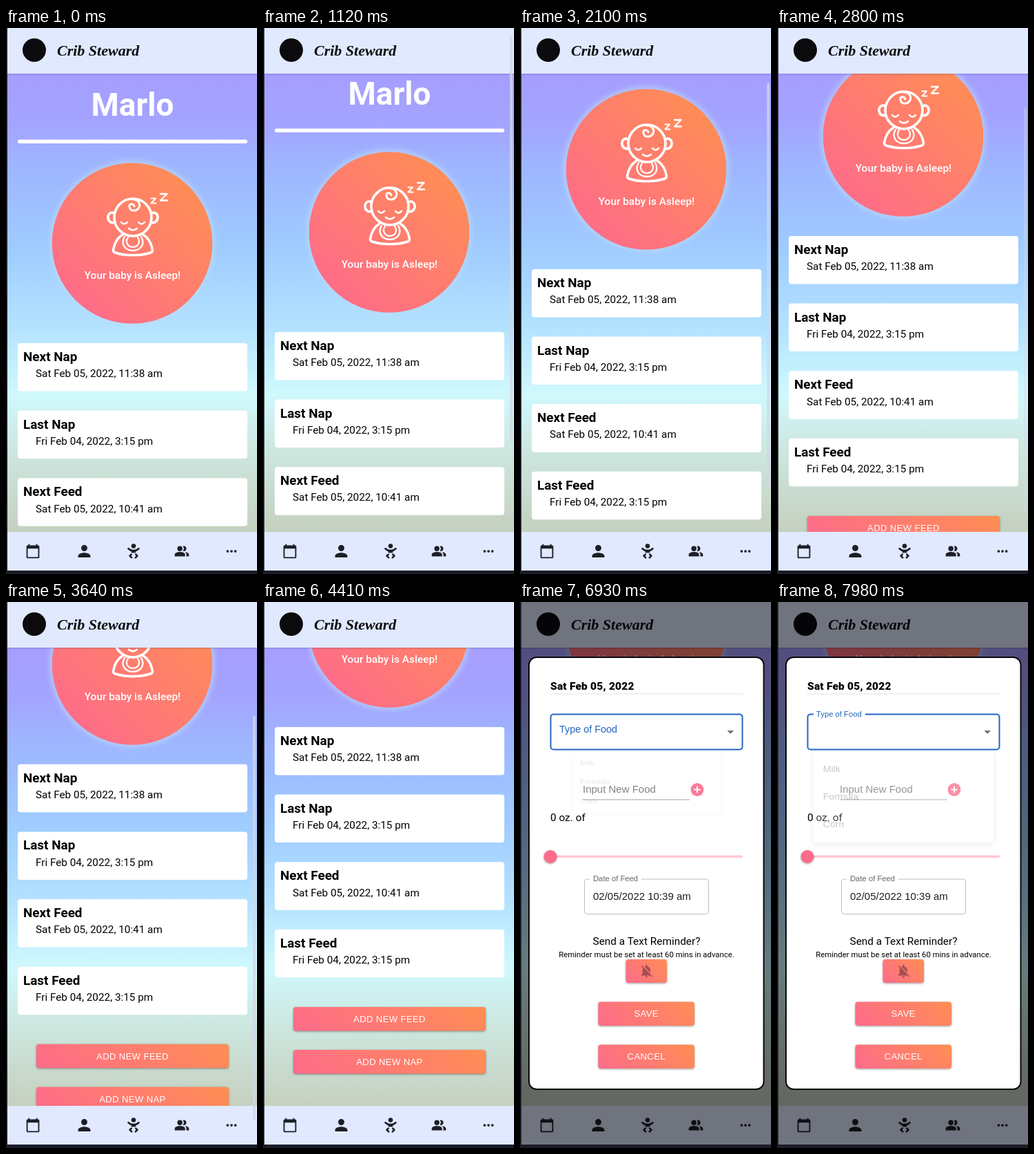
Animation, 364 px wide and 790 px high, one loop 8000 ms. Source, as an HTML page:

```html
<!DOCTYPE html>
<html lang="en">
<head>
<meta charset="utf-8">
<title>Nursery planner</title>
<style>
  html, body { margin: 0; width: 100%; height: 100%; overflow: hidden; background: #1c1d29; }
  svg { display: block; width: 364px; height: 790px; }
  text { font-family: Roboto, sans-serif; }
  .ui { font-family: "Liberation Sans", Arial, sans-serif; }
  .caps { font-size: 13.1px; letter-spacing: .37px; fill: #fff; text-anchor: middle; }
  .mid { text-anchor: middle; }
  .lift { filter: drop-shadow(0 1.5px 1.5px rgba(0,0,0,.38)); }
</style>
</head>
<body>
<svg id="stage" viewBox="0 0 364 790" xmlns="http://www.w3.org/2000/svg"></svg>
<script>
const LOOP = 8000, STEP = 70;
const stage = document.getElementById('stage');
const INK = '#1d1f27', EDGE = '#1c1d29', PINK = '#fe6b8b', ORANGE = '#ff8e53';

const clamp = v => Math.max(0, Math.min(1, v));
const span = (t, a, b) => clamp((t - a) / (b - a));
const smooth = p => p * p * (3 - 2 * p);
const mix = (a, b, p) => a + (b - a) * p;

const text = (x, y, size, str, attrs = '') =>
  `<text x="${x}" y="${y}" font-size="${size}" ${attrs}>${str}</text>`;

const rect = (x, y, w, h, attrs) =>
  `<rect x="${x}" y="${y}" width="${w}" height="${h}" ${attrs}/>`;

// Diagonal gradient at 45 degrees for a box of any proportion
let fills = 0;
function button(x, y, w, h, label) {
  const id = 'fill' + fills++, d = (w + h) / 4, cx = x + w / 2, cy = y + h / 2;
  return `<linearGradient id="${id}" gradientUnits="userSpaceOnUse"
      x1="${cx - d}" y1="${cy + d}" x2="${cx + d}" y2="${cy - d}">
      <stop stop-color="${PINK}"/><stop offset="1" stop-color="${ORANGE}"/></linearGradient>`
    + rect(x, y, w, h, `rx="4" fill="url(#${id})" class="lift"`)
    + text(cx, cy + 4.6, 13.1, label, 'class="ui caps"');
}

const card = (i, title, date) => {
  const y = 456 + i * 97.6;
  return rect(17, y, 333, 69.5, 'rx="4" fill="#fff"')
    + text(25, y + 26, 18.9, title, 'font-weight="600"')
    + text(43, y + 49.3, 15.3, date);
};

const icon = (x, y, body, scale = .9375) =>
  `<g transform="translate(${x} ${y}) scale(${scale}) translate(-12 -12)">${body}</g>`;

const backdrop = `
  <defs>
    <linearGradient id="sky" gradientUnits="userSpaceOnUse" x1="0" y1="66" x2="0" y2="729">
      <stop stop-color="#a69eff"/><stop offset=".11" stop-color="#a3a4ff"/>
      <stop offset=".2" stop-color="#9eb5ff"/>
      <stop offset=".38" stop-color="#9fcbff"/><stop offset=".55" stop-color="#b3e2ff"/>
      <stop offset=".7" stop-color="#cff9fd"/><stop offset=".82" stop-color="#cde7e0"/>
      <stop offset="1" stop-color="#c5d0bf"/>
    </linearGradient>
    <linearGradient id="disc" x1="0.1" y1=".9" x2=".9" y2=".1">
      <stop stop-color="${PINK}"/><stop offset="1" stop-color="${ORANGE}"/>
    </linearGradient>
    <filter id="soft" x="-20%" y="-20%" width="140%" height="140%"><feGaussianBlur stdDeviation="3.5"/></filter>
  </defs>
  ${rect(0, 0, 364, 790, `fill="${EDGE}"`)}
  ${rect(2, 60, 362, 670, 'fill="url(#sky)"')}`;

const baby = `
  <g fill="none" stroke="#fff" stroke-width="3.6" stroke-linecap="round" stroke-linejoin="round">
    <circle cx="184" cy="274" r="27"/>
    <path d="M157 268C151 265 147.500 270 148 275S153 283 158 281M211 268C217 265 220.500 270 220 275S215 283 210 281"/>
    <path d="M184 248C193 248 196 256 192 261S180 265 179 259S185 254 186 258" stroke-width="3"/>
    <path d="M167 281Q171.500 286 176 281M192 281Q196.500 286 201 281M178 290Q184 295 190 290" stroke-width="2.600"/>
    <path d="M169 299C161 304 157 313 155.500 321Q155.500 324 158 325C173 330 195 330 210 325Q212.500 324 212.500 321C211 313 207 304 199 299"/>
    <path d="M172 302C166 312 172 322 184 322S202 312 196 302" stroke-width="2.400"/>
    <path d="M177 303C172 310 177 317 184 317S196 310 191 303" stroke-width="2.200"/>
    <path d="M210.500 246.500H217L210.500 253.500H217.500" stroke-width="2"/>
    <path d="M224 240H233.500L224 249.500H234" stroke-width="2.300"/>
  </g>`;

const page = `
  <g id="page">
    ${text(183.5, 127, 46, 'Marlo', 'class="mid" font-weight="600" fill="#fff"')}
    ${rect(17, 161.5, 333, 5.5, 'rx="2.7" fill="#fff"')}
    <circle cx="183" cy="311.500" r="120" fill="#bcdcf8" opacity=".65" filter="url(#soft)"/>
    <circle cx="183" cy="311.500" r="116.300" fill="url(#disc)"/>
    ${baby}
    ${text(183.5, 363, 15.4, 'Your baby is Asleep!', 'class="mid" font-weight="500" fill="#fff"')}
    ${card(0, 'Next Nap', 'Sat Feb 05, 2022, 11:38 am')}
    ${card(1, 'Last Nap', 'Fri Feb 04, 2022, 3:15 pm')}
    ${card(2, 'Next Feed', 'Sat Feb 05, 2022, 10:41 am')}
    ${card(3, 'Last Feed', 'Fri Feb 04, 2022, 3:15 pm')}
    ${button(44, 861, 279, 34.5, 'ADD NEW FEED')}
    ${button(44, 923, 279, 34.5, 'ADD NEW NAP')}
  </g>`;

const bars = `
  ${rect(2, 0, 362, 66, 'fill="#e1e9ff" style="filter:drop-shadow(0 1px 1.5px rgba(60,60,120,.3))"')}
  <circle cx="41" cy="32" r="17" fill="#0b0b0e"/>
  ${text(74, 40, 22, 'Crib Steward', 'style="font-family:\'Liberation Serif\',serif" font-weight="700" font-style="italic" fill="#0b0b0e"')}
  ${rect(2, 729, 362, 56, 'fill="#e1e9ff"')}
  ${rect(0, 785, 364, 5, `fill="${EDGE}"`)}
  <g fill="${INK}">
    ${icon(39, 757, '<path d="M20 3h-1V1h-2v2H7V1H5v2H4c-1.1 0-2 .9-2 2v16c0 1.1.9 2 2 2h16c1.1 0 2-.9 2-2V5c0-1.1-.9-2-2-2zm0 18H4V8h16v13z"/>')}
    ${icon(113.5, 757, '<path d="M12 12c2.210 0 4-1.790 4-4s-1.790-4-4-4-4 1.790-4 4 1.790 4 4 4zm0 2c-2.670 0-8 1.340-8 4v2h16v-2c0-2.660-5.330-4-8-4z"/>', 1.12)}
    ${icon(185, 757, `<circle cx="12" cy="4" r="3.500"/>
      <path d="M8.500 10H15.500V14.500H8.500z"/>
      <path d="M4 8Q7 11 10 11H14Q17 11 20 8M8.500 17L6.200 19.200L9 22M15.500 17L17.800 19.200L15 22"
        fill="none" stroke="${INK}" stroke-width="2.700" stroke-linecap="round" stroke-linejoin="round"/>`)}
    ${icon(255, 757, `<path d="M16.670 13.130C18.040 14.060 19 15.320 19 17v3h4v-3c0-2.180-3.570-3.470-6.330-3.870z"/>
      <circle cx="9" cy="8" r="4"/>
      <path d="M15 12c2.210 0 4-1.790 4-4s-1.790-4-4-4c-.470 0-.910.1-1.330.240C14.500 5.270 15 6.580 15 8s-.5 2.730-1.330 3.760c.420.140.860.240 1.330.240zM9 13c-2.670 0-8 1.340-8 4v3h16v-3c0-2.660-5.330-4-8-4z"/>`)}
    ${icon(327, 757, [6, 12, 18].map(x => `<circle cx="${x}" cy="12" r="2"/>`).join(''))}
  </g>
  ${rect(358, 0, 4, 586, 'id="thumb" rx="2" fill="#d2d6ea"')}`;

const bell = `<path fill="#6b2f3c" opacity=".6" d="M20 18.690L7.840 6.140 5.270 3.490 4 4.760l2.800 2.800c-.520 1-.8 2.170-.8 3.430v5l-2 2v1h13.730l2 2L21 19.720zM12 22c1.110 0 2-.9 2-2h-4c0 1.110.9 2 2 2zm6-7.320V11c0-3.080-1.640-5.640-4.500-6.320V4c0-.83-.67-1.500-1.500-1.500s-1.500.67-1.500 1.500v.68c-.5.1-1 .3-1.440.56z"/>`;

const modal = `
  ${rect(2, 0, 362, 785, 'id="shade" fill="#000"')}
  <g id="modal">
    ${rect(13, 80, 340.5, 625, 'rx="11" fill="#fff" stroke="#08080a" stroke-width="2"')}
    ${text(44, 127, 15.5, 'Sat Feb 05, 2022', 'font-weight="900" letter-spacing=".2"')}
    ${rect(44, 132.5, 279, 1, 'fill="#e4e2e4"')}
    ${rect(44.5, 162.5, 278, 51, 'id="field" rx="4" fill="none"')}
    ${rect(53, 160, 75, 5, 'id="notch" fill="#fff"')}
    <text id="label" class="ui" font-size="15">Type of Food</text>
    <path d="M300.500 186H310L305.200 190.700z" fill="#6e6e6e"/>
    ${text(91, 276.3, 15, 'Input New Food', 'class="ui" fill="#757575"')}
    ${rect(91, 285.5, 155, 1, 'fill="#8b9e96"')}
    <circle cx="257" cy="271.500" r="9.400" fill="${PINK}"/>
    <path d="M252.300 271.500H261.700M257 266.800V276.200" stroke="#fff" stroke-width="2"/>
    ${text(44, 316.5, 15.4, '0 oz. of')}
    ${rect(44, 366.5, 279, 3.7, 'rx="1.8" fill="#ffc9d3"')}
    <circle cx="44" cy="368.400" r="9.400" fill="${PINK}" class="lift"/>
    ${rect(93.5, 401, 180, 50.5, 'rx="4" fill="none" stroke="#bdbdbd"')}
    ${rect(101, 399, 75, 4, 'fill="#fff"')}
    ${text(106, 403.7, 11.25, 'Date of Feed', 'class="ui" fill="#666"')}
    ${text(106, 431.2, 15, '02/05/2022 10:39 am', 'class="ui" fill="#1f1f1f"')}
    ${text(183.5, 496.3, 15.4, 'Send a Text Reminder?', 'class="mid"')}
    ${text(183.5, 513.5, 11.4, 'Reminder must be set at least 60 mins in advance.', 'class="mid"')}
    ${button(153.5, 517, 59.5, 34, '')}
    ${icon(183.3, 534, bell)}
    ${button(113.5, 578.5, 139.5, 34.5, 'SAVE')}
    ${button(113.5, 640.5, 139.5, 34.5, 'CANCEL')}
  </g>
  <g id="menu">
    ${rect(44, 0, 279, 150, 'rx="4" fill="#fff" style="filter:drop-shadow(0 4px 5px rgba(0,0,0,.3))"')}
    ${['Milk', 'Formula', 'Corn'].map((s, i) => text(59, 35.4 + i * 45, 15, s, 'class="ui" fill="#222"')).join('')}
  </g>`;

stage.innerHTML = backdrop + page + bars + modal;
const el = {};
stage.querySelectorAll('g[id], rect[id], text[id]').forEach(n => el[n.id] = n);
const set = (id, attrs) => { for (const k in attrs) el[id].setAttribute(k, attrs[k]); };

// Each swipe: start, end, distance, skew of the easing
const swipes = [[700, 1540, 45, 1.49], [1750, 2450, 110, .827], [3360, 3850, 120, 1.19]];
const scrollAt = t => swipes.reduce((s, [a, b, d, k]) => s + d * smooth(span(t, a, b)) ** k, 0);

const pulse = (t, a, b, c, d) => span(t, a, b) * (1 - span(t, c, d));

function draw(time) {
  const t = Math.floor(time / STEP) * STEP;
  const s = scrollAt(t);
  set('page', { transform: `translate(0 ${-s})` });
  set('thumb', {
    y: s * 204 / 275,
    opacity: .75 * (pulse(t, 700, 840, 2660, 2940) + pulse(t, 3360, 3500, 4060, 4340))
  });

  const open = smooth(span(t, 4760, 5110));
  set('shade', { opacity: open * .5 });
  set('modal', { opacity: open });

  const focus = smooth(span(t, 6860, 7140));
  const lit = focus > 0;
  const colour = lit ? '#2366bf' : '#666';
  set('field', { stroke: lit ? colour : '#cfc3c8', 'stroke-width': lit ? 2 : 1 });
  set('notch', { width: 75 * span(t, 6930, 7070) });
  set('label', {
    fill: colour,
    transform: `translate(57 ${mix(193, 165.6, focus)}) scale(${mix(1, .75, focus)})`
  });

  const grow = smooth(span(t, 6860, 7210));
  const leave = span(t, 7700, 8070);
  const size = grow - .25 * span(t, 7770, 7980) ** 1.5;
  set('menu', {
    opacity: grow * (1 - leave),
    transform: `translate(183.500 214.500) scale(${mix(.75, 1, size)} ${mix(.5625, 1, size)}) translate(-183.500 0)`
  });
}

let start;
function tick(now) {
  if (start === undefined) start = now;
  draw((now - start) % LOOP);
  requestAnimationFrame(tick);
}
draw(0);
requestAnimationFrame(tick);
</script>
</body>
</html>
```
